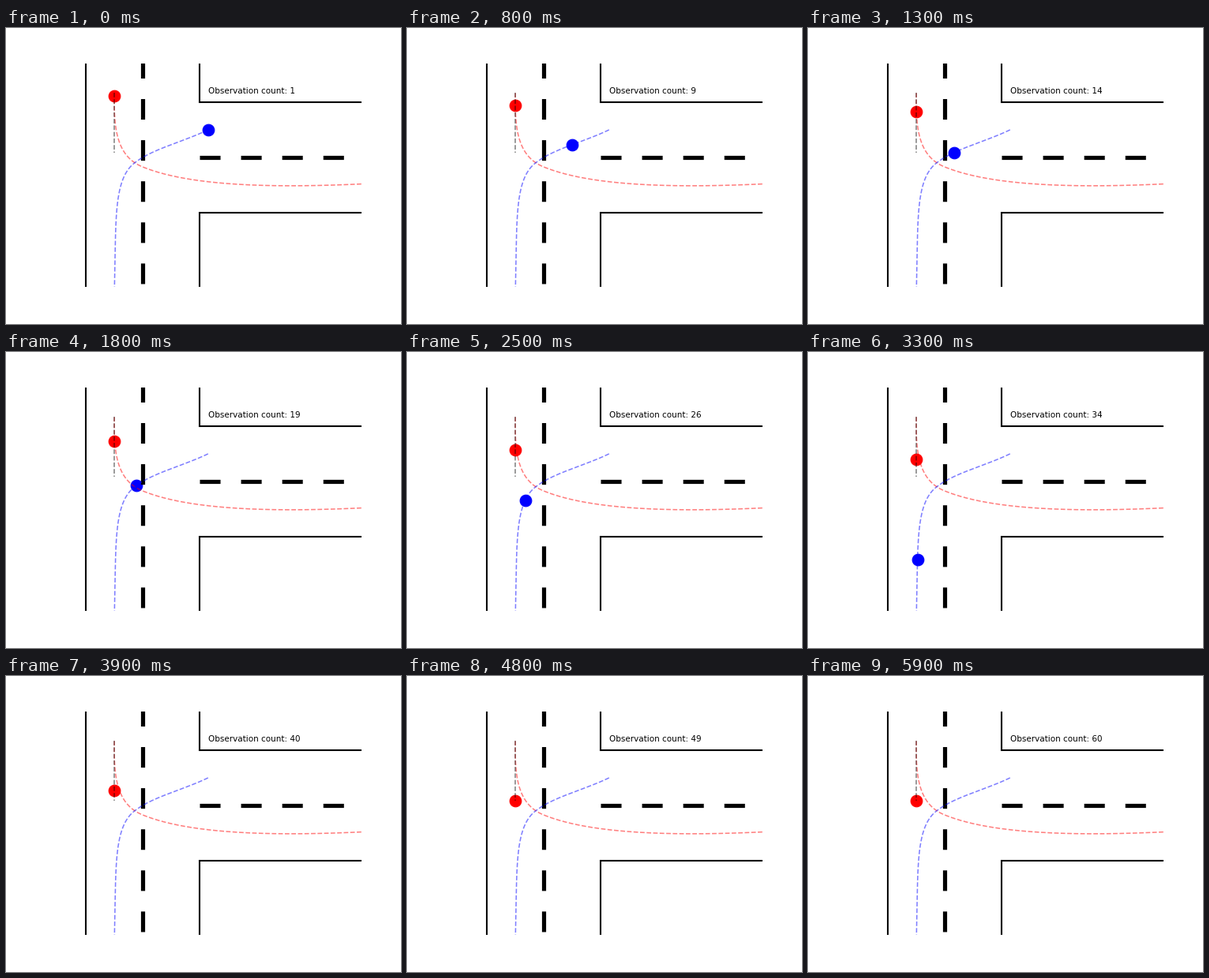
A matplotlib script for the animation above (6000 ms loop, 500 px wide and 375 px high).

```python
import numpy as np
import matplotlib.pyplot as plt
from matplotlib.animation import FuncAnimation

W, H, DPI = 500, 375, 75
FRAMES, INTERVAL = 60, 100


def bezier(a, b, c, d, n=200):
    t = np.linspace(0, 1, n)[:, None]
    a, b, c, d = map(np.array, (a, b, c, d))
    return ((1 - t)**3 * a + 3 * (1 - t)**2 * t * b
            + 3 * (1 - t) * t**2 * c + t**3 * d)


def join(first, second):
    return np.vstack([first, second[1:]]).T


# Stage coordinates in pixels, y pointing down
LANE_X, START_Y, STOP_Y = 137.2, 82.4, 158.2
red_path = join(
    bezier((LANE_X, START_Y), (136, 130), (141, 163), (173, 176)),
    bezier((173, 176), (230, 199.3), (330, 203.2), (450, 197.6)))
blue_path = join(
    bezier((255.8, 129), (225, 144), (186, 153), (164, 170)),
    bezier((164, 170), (134, 191), (140, 250), (137, 340)))

# Red creeps at constant speed and waits; blue brakes, then speeds away
RED_SPEED, RED_STOP = 1.5, 48
BLUE_SPEED, BRAKE, BOOST, TURN = 6.9, 0.155, 1.63, 25


def red_y(i):
    return STOP_Y - RED_SPEED * max(RED_STOP - i, 0)


def blue_xy(i):
    t, rest = min(i, TURN), max(i - TURN, 0)
    travelled = BLUE_SPEED * t - BRAKE * t**2 / 2
    travelled += (BLUE_SPEED - BRAKE * TURN) * rest + BOOST * rest**2 / 2
    return [np.interp(travelled, blue_length, c) for c in blue_path]


steps = np.hypot(*np.diff(blue_path, axis=1))
blue_length = np.concatenate([[0], np.cumsum(steps)])

fig = plt.figure(figsize=(W / DPI, H / DPI), dpi=DPI, facecolor="white")
ax = fig.add_axes([0.125, 0.125, 0.775, 0.755])
ax.set_xlim(0.125 * W, 0.9 * W)
ax.set_ylim(0.875 * H, 0.12 * H)
ax.axis("off")

# Road edges and centre lines
for xs, ys in [([101, 101], [0, H]),
               ([245, 245, W], [0, 94, 94]),
               ([245, 245, W], [H, 234, 234])]:
    ax.plot(xs, ys, color="black", lw=2, solid_joinstyle="miter")
for xs, ys in [([173, 173], [H + 1, 0]), ([245, W], [164, 164])]:
    ax.plot(xs, ys, color="black", lw=5, ls=(0, (5, 5)))

# Possible paths
for (xs, ys), color in [(red_path, "red"), (blue_path, "blue"),
                        (([LANE_X] * 2, [START_Y, STOP_Y]), "black")]:
    ax.plot(xs, ys, "--", color=color, lw=1.5, alpha=0.5)

red_car = ax.scatter([LANE_X], [red_y(0)], s=200, color="red")
blue_car = ax.scatter(*[[c] for c in blue_xy(0)], s=200, color="blue")
label = ax.text(256, 83.2, "", fontsize=10, family="DejaVu Sans")


def update(i):
    red_car.set_offsets([[LANE_X, red_y(i)]])
    blue_car.set_offsets([blue_xy(i)])
    label.set_text(f"Observation count: {i + 1}")
    return red_car, blue_car, label


anim = FuncAnimation(fig, update, frames=FRAMES, interval=INTERVAL,
                     repeat=True, repeat_delay=0)
plt.show()
```
